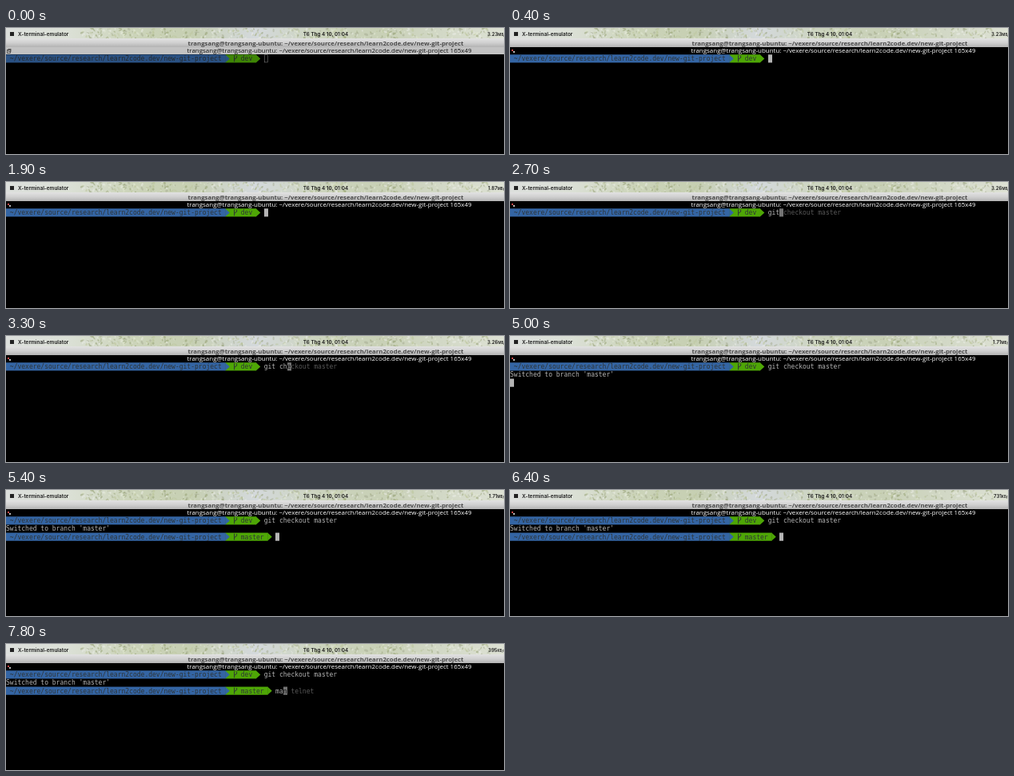
An HTML page with a canvas for the animation above (8000 ms loop, 623 by 158 pixels).

```html
<!DOCTYPE html>
<html lang="vi">
<head>
<meta charset="utf-8">
<title>Terminal</title>
<style>
  html, body { margin: 0; width: 100%; height: 100%; overflow: hidden; background: #000; }
  canvas { display: block; width: 623px; height: 158px; }
</style>
</head>
<body>
<canvas id="stage" width="623" height="158"></canvas>
<script>
const W = 623, H = 158, LOOP = 8000;
const ctx = document.getElementById('stage').getContext('2d');

const MONO = '8px "DejaVu Sans Mono", monospace';
const CELL = 8 * 0.602, ROW = 10.15, TOP = 33.3;
const PATH = '~/vexere/source/research/learn2code.dev/new-git-project';
const TITLE = 'trangsang@trangsang-ubuntu: ' + PATH;
const FG = '#b4b4b4', GHOST = '#585858', INK = '#2e3436', BLUE = '#3465a4', GREEN = '#4ea606';

const FOCUS = 400, ENTER = 4600, OUTPUT = 4700, PROMPT = 5100;
const CHECKOUT = {
  text: 'git checkout master',
  keys: [2400, 2600, 2700, 2900, 3200, 3300, 3500, 3500, 3500, 3700,
         3700, 3800, 3800, 3900, 4000, 4000, 4200, 4400, 4400]
};
const MAN = { text: 'man telnet', keys: [7500, 7700] };

// [start, value, unit, left edge]
const SPEEDS = [
  [0, '3.23', 'MB/s', 602], [1000, '1.87', 'MB/s', 603], [2700, '3.26', 'MB/s', 602],
  [4700, '1.71', 'MB/s', 604], [5700, '731', 'KB/s', 605],
  [6900, '412', 'KB/s', 603], [7700, '395', 'KB/s', 603]
];

// [start, end] spans in which the blinking cursor is hidden
const HIDDEN = [[1000, 1600], [2200, 2400], [5500, 6100], [6700, 7300]];

function rect(x, y, w, h, color) {
  ctx.fillStyle = color;
  ctx.fillRect(x, y, w, h);
}

function text(str, x, y, font, color, align = 'left') {
  ctx.font = font;
  ctx.fillStyle = color;
  ctx.textAlign = align;
  ctx.fillText(str, x, y);
}

function cells(str, col, row, color) {
  text(str, col * CELL, TOP + row * ROW + 8, MONO, color);
}

function gradient(x0, y0, x1, y1, stops) {
  const g = ctx.createLinearGradient(x0, y0, x1, y1);
  stops.forEach((color, i) => g.addColorStop(i / (stops.length - 1), color));
  return g;
}

function random(seed) {
  return () => (seed = (seed * 16807) % 2147483647) / 2147483647;
}

// Soft foliage with patches of sky behind the top bar.
function drawWallpaper() {
  rect(0, 0, W, 14, gradient(0, 0, W, 0,
    ['#dcdfdc', '#dbe0d6', '#ccd4ba', '#c6cfb2', '#d4d9dc', '#ccd4be', '#c8d0b6', '#d2d8c6', '#dde1d4']));
  const rnd = random(41);
  const tones = ['#8f9c6c', '#eef0ea', '#b9c496', '#e4e9d4', '#a3aa90'];
  ctx.globalAlpha = 0.5;
  for (let i = 0; i < 420; i++) {
    ctx.fillStyle = tones[i % tones.length];
    ctx.beginPath();
    ctx.ellipse(95 + rnd() * 510, rnd() * 14, 0.8 + rnd() * 2, 0.5 + rnd(), rnd() * 3, 0, 7);
    ctx.fill();
  }
  ctx.globalAlpha = 1;
}

function drawTopBar(t) {
  const font = size => `600 ${size}px Inter, sans-serif`;
  const [, value, unit, x] = SPEEDS.filter(s => s[0] <= t).pop();
  drawWallpaper();
  rect(5, 5, 5, 5, '#222');
  text('X-terminal-emulator', 15, 10, font(6.45), '#1c1c1c');
  text('T6 Thg 4 10, 01:04', 400, 10, font(6.3), '#1c1c1c', 'center');
  text(value, x, 10, font(6.1), '#1c1c1c');
  text(unit, x + ctx.measureText(value).width, 10, font(4.4), '#1c1c1c');
}

function drawTitles(focused) {
  rect(0, 13, W, 11, gradient(0, 13, 0, 24, ['#e2e2e2', '#d0d0d0', '#b2b2b2']));
  text(TITLE, 400, 22, 'bold 7.8px "Open Sans", sans-serif', '#4a4a4a', 'center');
  rect(0, 24, W, 10, '#000');
  if (!focused) rect(0, 24, W, 9, '#c2c2c2');
  text(TITLE + ' 165x49', 404.5, 31, '500 7.95px "Open Sans", sans-serif', focused ? '#fff' : '#111', 'center');
  if (focused) {
    rect(2, 27, 2, 2, '#d04848');
    rect(4, 29, 2, 2, '#b9b9b9');
  } else {
    ctx.strokeStyle = '#444';
    ctx.lineWidth = 0.8;
    ctx.strokeRect(1.5, 27.5, 4, 4);
    ctx.strokeRect(3, 26.5, 3, 3);
  }
}

function arrow(col, row, color) {
  const x = col * CELL, y = TOP + row * ROW;
  ctx.fillStyle = color;
  ctx.beginPath();
  ctx.moveTo(x - 0.3, y);
  ctx.lineTo(x + 5.3, y + ROW / 2);
  ctx.lineTo(x - 0.3, y + ROW);
  ctx.fill();
}

function branchIcon(col, row) {
  const x = col * CELL + 1, y = TOP + row * ROW;
  ctx.strokeStyle = INK;
  ctx.lineWidth = 1;
  ctx.beginPath();
  ctx.moveTo(x + 0.5, y + 1);
  ctx.lineTo(x + 0.5, y + 9);
  ctx.moveTo(x + 3.5, y + 1.5);
  ctx.lineTo(x + 3.5, y + 4);
  ctx.lineTo(x + 0.5, y + 6);
  ctx.stroke();
}

// Returns the column where the command starts.
function drawPrompt(branch, row) {
  const end = 62 + branch.length, y = TOP + row * ROW;
  rect(0, y, 57 * CELL, ROW, BLUE);
  rect(57 * CELL, y, (end - 57) * CELL, ROW, GREEN);
  arrow(57, row, BLUE);
  arrow(end, row, GREEN);
  cells(PATH, 1, row, INK);
  branchIcon(59, row);
  cells(branch, 61, row, INK);
  return end + 2;
}

function drawCursor(col, row, t, under = '') {
  if (HIDDEN.some(([a, b]) => t >= a && t < b)) return;
  const x = Math.round(col * CELL), y = TOP + row * ROW;
  if (t < FOCUS) {
    ctx.strokeStyle = FG;
    ctx.lineWidth = 0.5;
    ctx.strokeRect(x + 0.5, y + 0.5, 4, ROW - 1);
    return;
  }
  rect(x, y, 5, ROW, under ? '#747474' : FG);
  cells(under, col, row, '#111');
}

function drawCommand({ text: line, keys }, col, row, t, active) {
  const count = keys.filter(k => k <= t).length;
  cells(line.slice(0, count), col, row, FG);
  if (count) cells(line.slice(count), col + count, row, GHOST);
  if (active) drawCursor(col + count, row, t, count ? line.charAt(count) : '');
}

function drawTerminal(t) {
  rect(0, 34, W, H - 34, '#000');
  drawCommand(CHECKOUT, drawPrompt('dev', 0), 0, t, t < ENTER);
  if (t >= OUTPUT) cells("Switched to branch 'master'", 0, 1, FG);
  if (t >= PROMPT) drawCommand(MAN, drawPrompt('master', 2), 2, t, true);
  else if (t >= ENTER) drawCursor(0, t < OUTPUT ? 1 : 2, t);
  if (t < FOCUS) rect(0, 33, W, H - 33, 'rgba(0,0,0,0.2)');
}

const start = performance.now();
function frame() {
  const t = (performance.now() - start) % LOOP;
  drawTopBar(t);
  drawTitles(t >= FOCUS);
  drawTerminal(t);
  requestAnimationFrame(frame);
}
frame();
</script>
</body>
</html>
```
